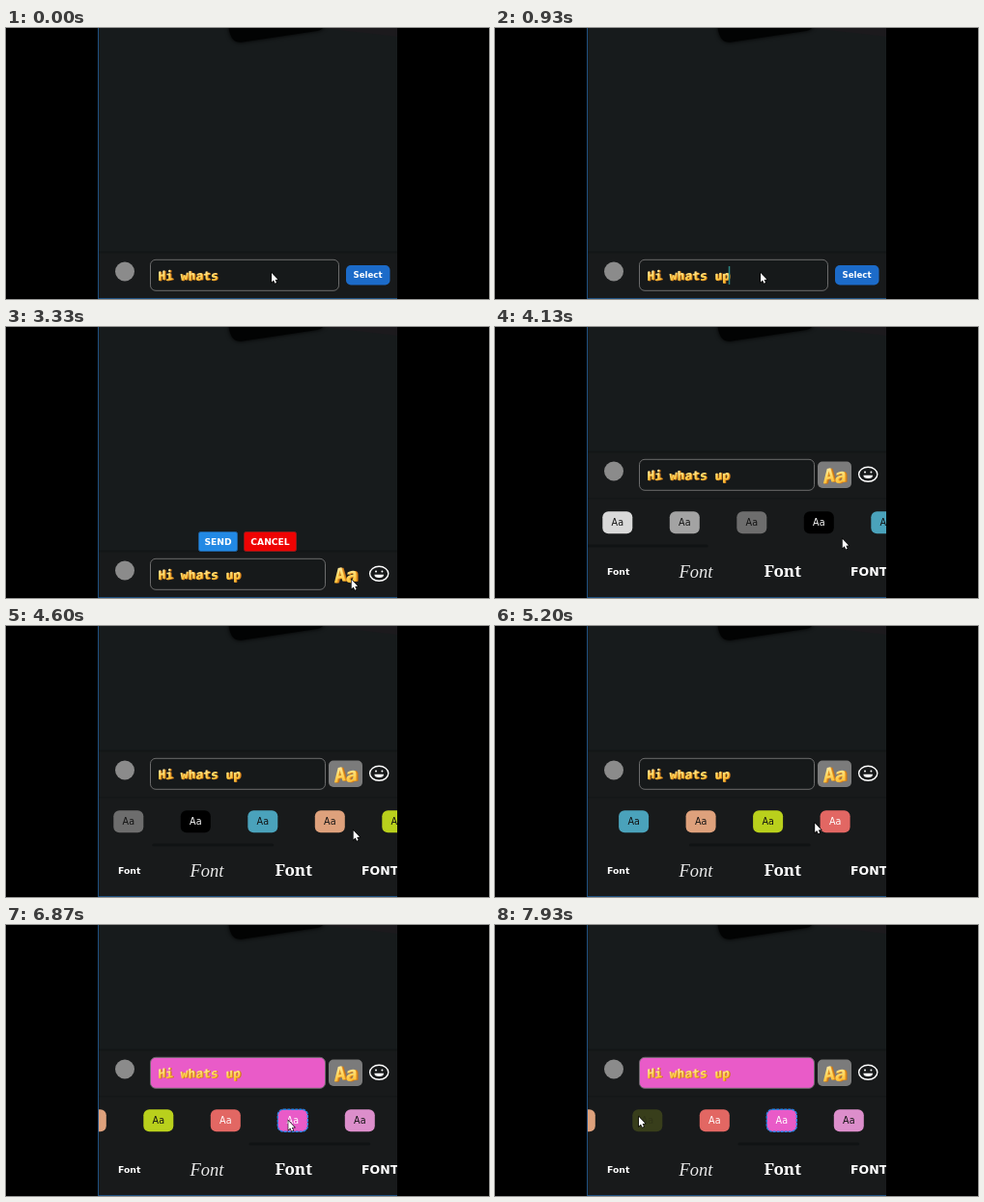
An HTML page with a canvas that plays this animation: 500 px wide and 281 px high, repeating every 8 s.

```html
<!DOCTYPE html>
<html lang="en">
<head>
<meta charset="utf-8">
<title>Chat font picker</title>
<style>
  html, body { margin: 0; width: 100%; height: 100%; overflow: hidden; background: #000; }
  canvas { display: block; width: 100vw; height: 100vh; }
</style>
</head>
<body>
<canvas id="stage" width="500" height="281"></canvas>
<script>
const LOOP = 8000;
const TYPED = [300, 550, 800];
const SELECT_AT = 2500, OPEN_AT = 3500, PINK_AT = 6700;
const ROW_SHIFT = -103;
const STEP = 69.5, VIEW = 310;
const PINK = '#e95bc8';
const SANS = '"DejaVu Sans", sans-serif';
const SWATCHES = ['#d9d9d9', '#a3a3a3', '#6d6d6d', '#000', '#4aa2bb', '#dea17c',
                  '#b9d01c', '#e26763', PINK, '#dc8ecb', '#9a7fd6'];
const DARK_LABELS = new Set([0, 1, 2, 4, 5, 6, 9]);
const POINTER = [[0, 275, 254], [1400, 275, 254], [2070, 301.5, 253], [2380, 374, 256],
  [2700, 374, 256], [3330, 357.7, 262], [3700, 358, 262], [4200, 360, 213], [4600, 359.7, 212],
  [5200, 331.3, 204.5], [5930, 258, 211], [6400, 297, 203], [6850, 297, 203],
  [7500, 152, 200], [7700, 149, 199], [8000, 149, 199]];
const SCROLL = [[0, 0], [4150, 0], [4550, 139], [4680, 139], [5200, 261], [5820, 386], [8000, 386]];
const PRESSES = { select: [2420, SELECT_AT], pink: [6550, PINK_AT], green: [7650, 8000] };

const ctx = document.getElementById('stage').getContext('2d');

// Linear interpolation through [time, ...values] keys.
function track(keys, t) {
  const i = Math.max(1, keys.findIndex(k => k[0] > t));
  const a = keys[i - 1], b = keys[i];
  const p = (t - a[0]) / (b[0] - a[0]);
  return a.slice(1).map((v, n) => v + (b[n + 1] - v) * p);
}

// Pressed controls fade quickly to a fifth of their opacity.
function pressAlpha(name, t) {
  const [from, to] = PRESSES[name];
  return t < from || t >= to ? 1 : 1 - 0.8 * Math.min(1, (t - from) / 100);
}

function box(x, y, w, h, r, fill, stroke, line = 1) {
  ctx.beginPath();
  ctx.roundRect(x, y, w, h, r);
  if (fill) { ctx.fillStyle = fill; ctx.fill(); }
  if (stroke) { ctx.strokeStyle = stroke; ctx.lineWidth = line; ctx.stroke(); }
}

function label(text, x, y, font, color = '#fff', align = 'center') {
  ctx.font = font;
  ctx.textAlign = align;
  ctx.fillStyle = color;
  ctx.fillText(text, x, y);
}

// Isometric gold lettering: pale faces with an extruded amber side.
function goldText(text, x, y, size) {
  const font = `bold ${size}px "DejaVu Sans Mono", monospace`;
  const advance = size * 0.602;
  const depth = size / 9;
  const face = ctx.createLinearGradient(0, -size * 0.75, 0, 0);
  face.addColorStop(0, '#ffe9a0');
  face.addColorStop(0.5, '#ffdc6a');
  face.addColorStop(1, '#ffc23a');
  [...text].forEach((char, i) => {
    ctx.save();
    ctx.translate(x + i * advance, y);
    ctx.transform(1, -0.22, 0, 1, 0, 0);
    label(char, depth, depth * 0.5, font, '#c8741a', 'left');
    label(char, depth / 2, depth * 0.25, font, '#e89a24', 'left');
    label(char, 0, 0, font, face, 'left');
    ctx.restore();
  });
}

function backdrop() {
  ctx.fillStyle = '#000';
  ctx.fillRect(0, 0, 500, 281);
  ctx.fillStyle = '#171b1c';
  ctx.fillRect(95, 0, VIEW, 281);
  ctx.fillStyle = '#1c1a1d';
  ctx.beginPath();
  ctx.moveTo(328, 0); ctx.lineTo(405, 0); ctx.lineTo(405, 9);
  ctx.closePath();
  ctx.fill();
  ctx.save();
  ctx.shadowColor = '#000';
  ctx.shadowBlur = 4;
  ctx.fillStyle = '#020303';
  ctx.beginPath();
  ctx.moveTo(230, -3);
  ctx.lineTo(232, 6);
  ctx.quadraticCurveTo(235, 16, 245, 14.5);
  ctx.lineTo(322, 3);
  ctx.quadraticCurveTo(328, 2, 330, -3);
  ctx.fill();
  ctx.restore();
}

function smiley(x, y) {
  ctx.strokeStyle = ctx.fillStyle = '#fff';
  ctx.lineWidth = 1.4;
  ctx.beginPath();
  ctx.ellipse(x, y, 9.6, 7.5, 0, 0, 7);
  ctx.stroke();
  for (const dx of [-3.2, 3.2]) {
    ctx.beginPath();
    ctx.arc(x + dx, y - 2.2, 1, 0, 7);
    ctx.fill();
  }
  ctx.beginPath();
  ctx.ellipse(x, y + 1, 4.8, 3.2, 0, 0, Math.PI);
  ctx.fill();
}

function inputRow(t, open, styling) {
  ctx.fillStyle = '#181a1b';
  ctx.fillRect(95, 233, VIEW, 151);
  ctx.fillStyle = '#131617';
  ctx.fillRect(95, 231.5, VIEW, 2);

  ctx.fillStyle = '#8b8b8b';
  ctx.beginPath();
  ctx.arc(123, 252.5, 10, 0, 7);
  ctx.fill();

  box(149.5, 240.3, styling ? 181 : 195, 32, 5.5, t >= PINK_AT ? PINK : '#16191a', '#6c6c6c');
  const count = TYPED.filter(at => t >= at).length;
  goldText('Hi whats up'.slice(0, 8 + count), 157.3, 262.3, 12.9);
  if (!styling && count && (t - 900 + 1060) % 1060 < 530) {
    ctx.fillStyle = '#2b8583';
    ctx.fillRect(157.3 + (8 + count) * 7.77 - 1, 247, 1.5, 19);
  }

  if (styling) {
    if (open) box(334, 242.5, 35, 27.5, 5, '#7b7b7b');
    goldText('Aa', 339.5, 265.5, 20);
    smiley(386.2, 255.8);
  } else {
    ctx.globalAlpha = pressAlpha('select', t);
    box(352, 246, 45.5, 20.5, 5, '#1c6bc9');
    label('Select', 374.5, 259.3, `bold 8.6px ${SANS}`);
    ctx.globalAlpha = 1;
  }
}

function actionButton(text, x, w, fill, edge) {
  box(x + 0.5, 212.5, w, 20, 2, fill, edge);
  label(text, x + w / 2 + 0.5, 226, `bold 9.2px ${SANS}`);
}

function swatchRow(t) {
  const [scroll] = track(SCROLL, t);
  SWATCHES.forEach((color, i) => {
    const x = 111.3 + i * STEP - scroll;
    ctx.globalAlpha = i === 6 ? pressAlpha('green', t) : i === 8 ? pressAlpha('pink', t) : 1;
    box(x, 191.2, 31, 23, 6, color);
    if (i === 8 && t >= PINK_AT) {
      ctx.setLineDash([3, 1]);
      box(x, 191.2, 31, 23, 6, null, '#2586e8', 1.4);
      ctx.setLineDash([]);
    }
    label('Aa', x + 15.5, 206, `9.6px ${SANS}`, DARK_LABELS.has(i) ? '#111' : '#fff');
  });
  ctx.globalAlpha = 1;
  const ratio = VIEW / (SWATCHES.length * STEP);
  box(95 + scroll * ratio, 225.5, VIEW * ratio, 3, 1.5, '#101314');
}

function fontRow() {
  label('Font', 116, 257.2, `bold 9.3px ${SANS}`, '#fff', 'left');
  label('Font', 190.5, 260, 'italic 18.5px "Liberation Serif", cursive', '#e8e8e8', 'left');
  label('Font', 278.5, 259, '900 17px "Noto Serif", serif', '#fff', 'left');
  label('FONT', 368, 258, `bold 12.5px ${SANS}`, '#fff', 'left');
}

function pointer(t) {
  const [x, y] = track(POINTER, t);
  ctx.save();
  ctx.translate(x, y);
  ctx.beginPath();
  [[0, 0], [0, 9.5], [2, 7.6], [3.5, 10.8], [5, 10.1], [3.6, 7], [6.4, 6.8]]
    .forEach(p => ctx.lineTo(...p));
  ctx.closePath();
  ctx.strokeStyle = '#000';
  ctx.lineWidth = 1.2;
  ctx.stroke();
  ctx.fillStyle = '#fff';
  ctx.fill();
  ctx.restore();
}

function draw(t) {
  const styling = t >= SELECT_AT, open = t >= OPEN_AT;
  backdrop();
  ctx.save();
  ctx.beginPath();
  ctx.rect(95, 0, VIEW, 281);
  ctx.clip();
  ctx.save();
  if (open) ctx.translate(0, ROW_SHIFT);
  inputRow(t, open, styling);
  ctx.restore();
  if (open) {
    ctx.fillStyle = '#141718';
    ctx.fillRect(95, 177, VIEW, 1.5);
    swatchRow(t);
    fontRow();
  } else if (styling) {
    actionButton('SEND', 199, 40, '#2289e4', '#1f5f9b');
    actionButton('CANCEL', 246, 54, '#ee0303', '#8f1a1a');
  }
  ctx.restore();
  ctx.fillStyle = '#1f5080';
  ctx.fillRect(95, 0, 1, 281);
  ctx.fillRect(95, 280, VIEW, 1);
  pointer(t);
}

function tick() {
  draw(performance.now() % LOOP);
  requestAnimationFrame(tick);
}
tick();
</script>
</body>
</html>
```
